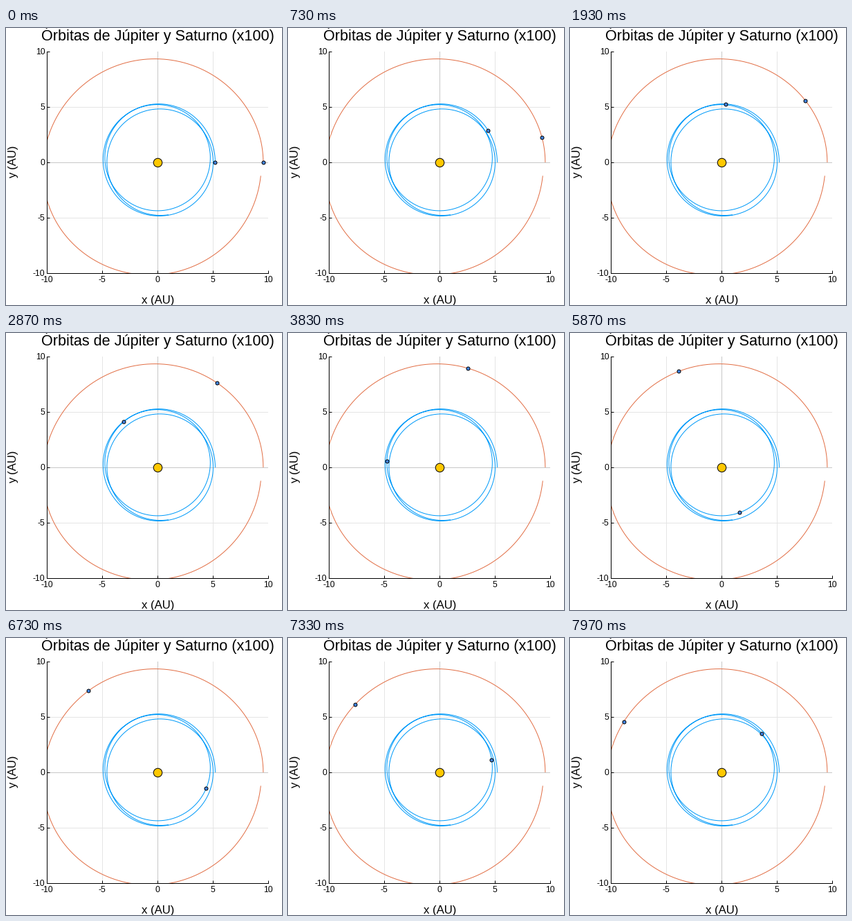
Animation, 399 px wide and 400 px high, one loop 8 s. Source, as a matplotlib script:

```python
import numpy as np
import matplotlib.pyplot as plt
from matplotlib.animation import FuncAnimation

W, H, DPI = 399, 400, 100
FRAMES, INTERVAL = 400, 20
STEP_MS = 100 / 3        # the planets advance 30 times a second
PX = 72 / DPI            # points per pixel
LEFT, TOP, SIDE = 59.2, 33.6, 320
CX, CY, UNIT = LEFT + SIDE / 2, TOP + SIDE / 2, SIDE / 20

GM = 4 * np.pi**2        # AU^3 / yr^2
PULL = 0.0286 * GM       # mutual attraction, planet mass enlarged 100 times
SUBSTEPS = 10
DT = 0.05 / SUBSTEPS     # years
SWEEP = 352.3            # degrees covered by Saturn's trail

plt.rcParams["font.family"] = "Liberation Sans"


def acceleration(jup, sat):
    gap = sat - jup
    pull = PULL * gap / abs(gap)**3
    return (-GM * jup / abs(jup)**3 + pull,
            -GM * sat / abs(sat)**3 - pull)


def simulate(years):
    """Leapfrog integration of both planets around a fixed Sun."""
    pos, vel = [5.2 + 0j, 9.54 + 0j], [2.755j, 2.042j]
    acc, track = acceleration(*pos), []
    for _ in range(int(years / DT)):
        track.append(tuple(pos))
        half = [v + a * DT / 2 for v, a in zip(vel, acc)]
        pos = [p + v * DT for p, v in zip(pos, half)]
        acc = acceleration(*pos)
        vel = [v + a * DT / 2 for v, a in zip(half, acc)]
    return np.array(track)


track = simulate(32)
swept = np.degrees(np.unwrap(np.angle(track[:, 1])))
track = track[swept < SWEEP]

fig = plt.figure(figsize=(W / DPI, H / DPI), dpi=DPI, facecolor="white")
ax = fig.add_axes([LEFT / W, 1 - (TOP + SIDE) / H, SIDE / W, SIDE / H])
ax.set(xlim=(-10, 10), ylim=(-10, 10))
ticks = range(-10, 11, 5)
ax.set_xticks(ticks, [])
ax.set_yticks(ticks, [])
ax.tick_params(direction="in", length=4 * PX, width=PX)
for side in ("top", "right"):
    ax.spines[side].set_visible(False)
for side in ("left", "bottom"):
    ax.spines[side].set_linewidth(PX)

for value in (-5, 0, 5):
    shade = "#c8c8c8" if value == 0 else "#e5e5e5"
    ax.axhline(value, color=shade, lw=PX, zorder=0.5)
    ax.axvline(value, color=shade, lw=PX, zorder=0.5)


def label(x, y, text, size, **kw):
    kw = {"ha": "center", "va": "baseline", **kw}
    fig.text(x / W, 1 - y / H, text, fontsize=size, color="black", **kw)


label(219.5, 18.3, "Órbitas de Júpiter y Saturno (x100)", 15.55)
label(219.5, 398, "x (AU)", 12.1)
label(15, CY, "y (AU)", 12.1, rotation=90, rotation_mode="anchor")
for value in ticks:
    label(CX + UNIT * value, 367, str(value), 8.8)
    label(56.5, CY + 4 - UNIT * value, str(value), 8.8, ha="right")


def disc(size, color):
    return ax.plot([0], [0], "o", ms=size * PX, mfc=color, mec="black",
                   mew=PX, zorder=4)[0]


disc(12.5, "#ffc800")
planets = []
for path, color in zip(track.T, ("#009af9", "#e26f46")):
    ax.plot(path.real, path.imag, color=color, lw=PX, zorder=2)
    planets.append((path, disc(5, "#4285e8")))


def update(frame):
    step = int((frame + 0.5) * INTERVAL / STEP_MS + 0.15)
    for path, dot in planets:
        spot = path[step * SUBSTEPS]
        dot.set_data([spot.real], [spot.imag])
    return [dot for _, dot in planets]


anim = FuncAnimation(fig, update, frames=FRAMES, interval=INTERVAL,
                     repeat=True, repeat_delay=0, blit=False)
plt.show()
```
